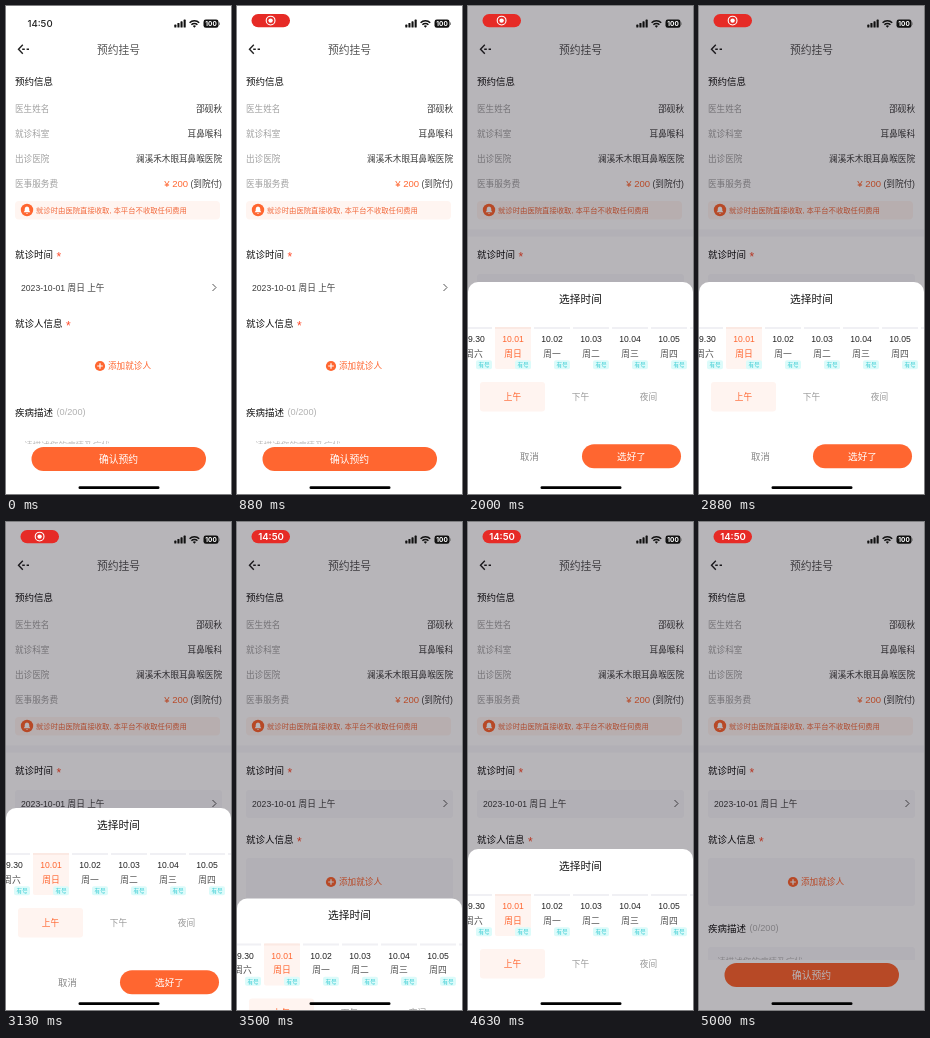
An HTML page for the animation above (5.12 s loop, 225x488 px).

```html
<!DOCTYPE html>
<html lang="zh-CN">
<head>
<meta charset="utf-8">
<style>
html, body { margin: 0; width: 100%; height: 100%; overflow: hidden; background: #fff; }
svg { display: block; width: 100vw; height: 100vh; }
text { font-family: "Liberation Sans", "Noto Sans CJK SC", "Noto Sans CJK", sans-serif; white-space: pre; }
.ui { font-family: Inter, sans-serif; }
</style>
</head>
<body>
<svg id="stage" viewBox="0 0 225 488"></svg>
<script>
const ORANGE = '#ff6630', INK = '#3c3c3c', TINT = '#fff4f0', PANEL = '#f7f7fa';

const rect = (x, y, w, h, fill, r = 0, extra = '') =>
  `<rect x="${x}" y="${y}" width="${w}" height="${h}" rx="${r}" fill="${fill}" ${extra}/>`;
const circle = (x, y, r, fill, extra = '') =>
  `<circle cx="${x}" cy="${y}" r="${r}" fill="${fill}" ${extra}/>`;
const line = (d, stroke, w) => `<path d="${d}" fill="none" stroke="${stroke}" stroke-width="${w}"/>`;
// y is the vertical middle of the glyphs
const text = (x, y, s, size, fill, anchor = 'start', extra = '') =>
  `<text x="${x}" y="${y + size * 0.38}" font-size="${size}" fill="${fill}" text-anchor="${anchor}" ${extra}>${s}</text>`;
const mid = (x, y, s, size, fill) => text(x, y, s, size, fill, 'middle');
const heading = (y, s) => text(9, y, s, 9.5, '#111', 'start', 'font-weight="500"');
const star = (x, y) => text(x, y + 2.7, '*', 12, '#ff4a2a');
const row = (y, label, value) => text(9, y, label, 8.6, '#a0a0a0') + text(216, y, value, 8.6, INK, 'end');
const clock = (y, fill, weight) =>
  text(34, y, '14:50', 9.6, fill, 'middle', `class="ui" font-weight="${weight}"`);

const page = () =>
  line('M16.8 38.8L12.5 43.3L16.8 47.8', '#222', 1.4) +
  line('M16.2 43.3H18.8M20.6 43.3H23', '#222', 1.6) +
  mid(112.5, 43.4, '预约挂号', 10.8, '#555') +
  heading(75, '预约信息') +
  row(103, '医生姓名', '邵砚秋') +
  row(128, '就诊科室', '耳鼻喉科') +
  row(153, '出诊医院', '澜溪禾木眼耳鼻喉医院') +
  row(178, '医事服务费', `<tspan fill="${ORANGE}" font-size="9.5">¥ 200</tspan> (到院付)`) +
  rect(9, 195, 205, 18.5, '#fff5f1', 4) +
  circle(21, 204, 6.2, ORANGE) +
  '<path d="M17.6 206.2L18.7 204.8V203A2.3 2.5 0 0 1 23.3 203V204.8L24.4 206.2ZM20 206.9H22L21 208Z" fill="#fff"/>' +
  text(30, 204, '就诊时由医院直接收取, 本平台不收取任何费用', 7.35, '#f2693c') +
  heading(248, '就诊时间') + star(50.5, 248) +
  `<g id="panels">${rect(0, 223.5, 225, 7, PANEL)}${rect(9, 268, 207, 28, PANEL, 3)}` +
  `${rect(9, 336, 207, 48, PANEL, 3)}${rect(9, 425, 207, 40, PANEL, 3)}</g>` +
  text(15, 281.5, '2023-10-01 周日 上午', 8.65, INK) +
  line('M206.5 278L210 281.5L206.5 285', '#555', 1) +
  heading(317, '就诊人信息') + star(60, 317) +
  circle(94, 360, 5.1, ORANGE) +
  line('M91.2 360H96.8M94 357.2V362.8', '#fff', 1.2) +
  text(102, 360, '添加就诊人', 8.6, ORANGE) +
  heading(406, '疾病描述') + text(50.5, 406, '(0/200)', 9.2, '#b0b0b0') +
  text(18, 440, '请描述您的病情及症状', 8.6, '#bbb') +
  rect(0, 438, 225, 50, '#fff') +
  rect(25.5, 441, 174.5, 24, ORANGE, 12) +
  mid(112.5, 453, '确认预约', 9.8, '#fff');

const days = [['09.30', '六'], ['10.01', '日'], ['10.02', '一'], ['10.03', '二'], ['10.04', '三'], ['10.05', '四'], ['10.06', '五']];
const dayCell = ([date, day], i) => {
  const x = -12 + i * 39, on = i === 1;
  return rect(x, 321, 36, 42, on ? TINT : '#fff', 2) +
    rect(x, 321, 36, 2, on ? '#fbe9e3' : '#f0f0f4') +
    mid(x + 18, 332.8, date, 8.6, on ? ORANGE : '#222') +
    mid(x + 18, 347.3, '周' + day, 8.8, on ? ORANGE : '#555') +
    rect(x + 20, 354.3, 16, 9, '#dcfbfa', 2) +
    mid(x + 28, 358.9, '有号', 5.6, '#35cbd2');
};

const sheet = () =>
  rect(0, 276, 225, 240, '#fff', 10) +
  mid(112.5, 292.8, '选择时间', 10.7, '#111') +
  days.map(dayCell).join('') +
  rect(12, 376, 65, 29.5, TINT, 3) +
  mid(44.5, 390.5, '上午', 8.7, ORANGE) +
  mid(112.5, 390.5, '下午', 8.7, '#999') +
  mid(180.5, 390.5, '夜间', 8.7, '#999') +
  mid(61.5, 450, '取消', 9.4, '#888') +
  rect(114, 438.3, 99, 24, ORANGE, 12) +
  mid(163.5, 450.3, '选好了', 9.6, '#fff');

const status = () =>
  [3, 4.6, 6.3, 8].map((h, i) => rect(168.3 + i * 3.1, 21.6 - h, 2.1, h, '#111', 0.6)).join('') +
  line('M183.6 16.7A6.6 6.6 0 0 1 193.2 16.7M185.4 18.7A4.2 4.2 0 0 1 191.4 18.7', '#111', 1.5) +
  '<path d="M186.8 20A2.4 2.4 0 0 1 190 20L188.4 21.7Z" fill="#111"/>' +
  rect(197.5, 13.6, 15, 8.2, '#111', 2.4) + rect(213, 16.3, 1, 2.8, '#888', 0.5) +
  text(205, 17.6, '100', 6.4, '#fff', 'middle', 'class="ui" font-weight="700"') +
  `<g id="plain">${clock(17, '#222', 500)}</g>` +
  `<g id="pill">${rect(14.5, 8, 38.5, 13.3, '#e62b26', 6.6)}</g>` +
  `<g id="rec">${circle(33.6, 14.6, 4.4, 'none', 'stroke="#fff" stroke-width="1.1"')}${circle(33.6, 14.6, 2.2, '#fff')}</g>` +
  `<g id="pillClock">${clock(14.5, '#fff', 600)}</g>` +
  rect(72.5, 480.3, 81, 2.8, '#000', 1.4);

const $ = id => document.getElementById(id);
$('stage').innerHTML = page() + rect(0, 0, 225, 488, '#0a0010', 0, 'id="mask"') + `<g id="sheet">${sheet()}</g>` + status();

// [ms, value] points joined by straight lines
const dim = [[1625, 0], [1750, 0.113], [1875, 0.235], [2000, 0.292]];
const drop = [[1625, 214], [1750, 62], [1875, 12], [2000, 0], [3000, 0], [3125, 10], [3500, 100.5],
  [3625, 25], [3750, 0], [4375, 0], [4500, 12], [4750, 90], [5000, 214]];

function at(points, t) {
  const i = points.findIndex(p => p[0] > t);
  if (i === 0) return points[0][1];
  if (i < 0) return points[points.length - 1][1];
  const [t0, a] = points[i - 1], [t1, b] = points[i];
  return a + (b - a) * (t - t0) / (t1 - t0);
}

const show = (id, on) => $(id).setAttribute('visibility', on ? 'visible' : 'hidden');

function draw(now) {
  const t = Math.min(5000, Math.floor(now % 5120 / 125) * 125);
  const shade = at(dim, t), recording = t >= 375, timed = t >= 3250;
  $('mask').setAttribute('opacity', shade);
  $('panels').setAttribute('opacity', Math.min(1, shade * 9));
  $('sheet').setAttribute('transform', `translate(0 ${at(drop, t)})`);
  show('plain', !recording);
  show('pill', recording);
  show('rec', recording && !timed);
  show('pillClock', timed);
}

const start = performance.now();
function loop() {
  draw(performance.now() - start);
  requestAnimationFrame(loop);
}
loop();
</script>
</body>
</html>
```
